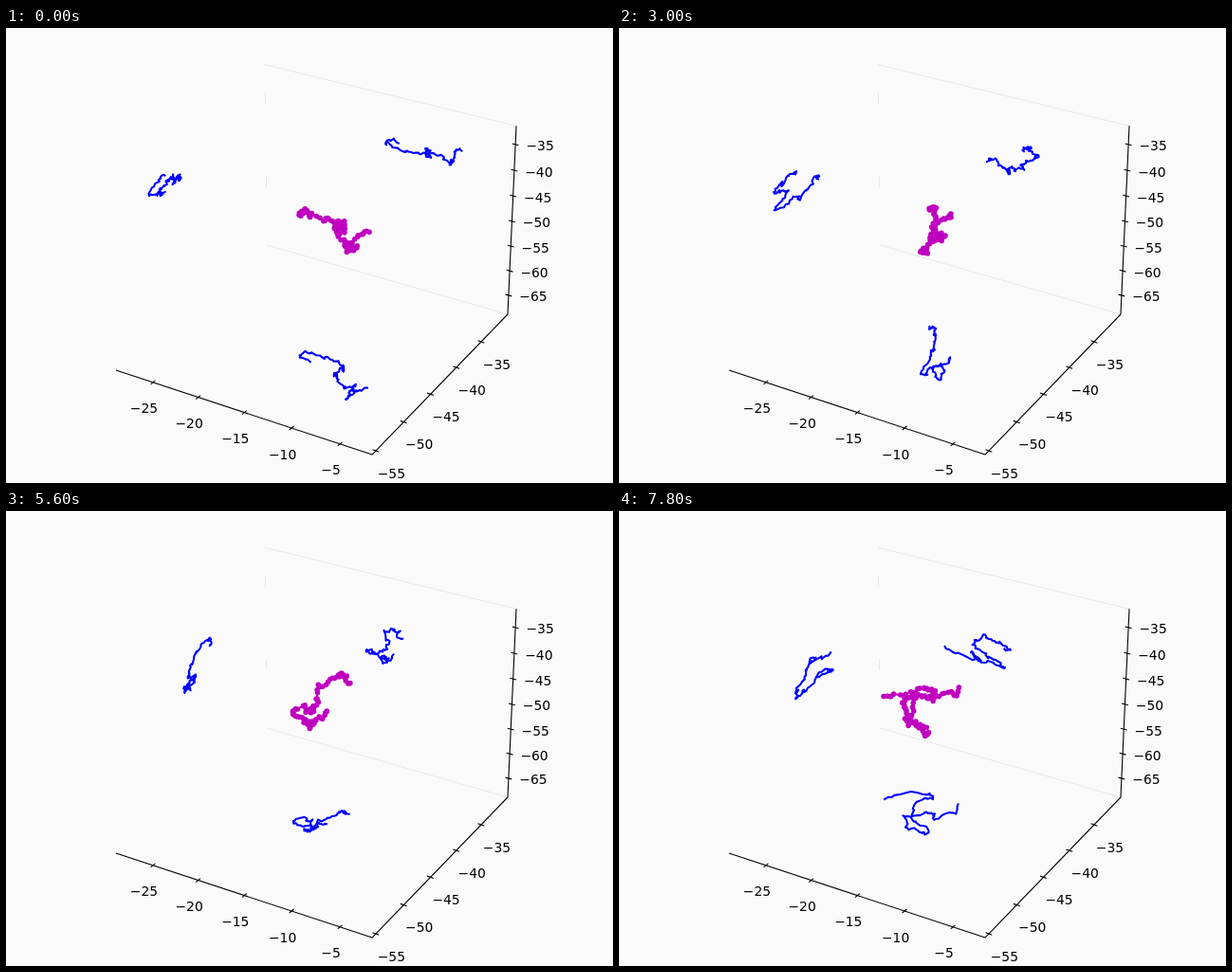
Write an HTML page that moves like this. It is 640x480 px and loops after 8000 ms.

```html
<!DOCTYPE html>
<html lang="en">
<head>
<meta charset="utf-8">
<title>Chain in a box</title>
<style>
html, body { margin: 0; width: 100%; height: 100%; overflow: hidden; background: #fafafa; }
svg { display: block; width: 640px; height: 480px; }
path { fill: none; stroke-linejoin: round; }
.edge { stroke: #e9e9e9; }
.axis { stroke: #000; stroke-width: 1.1; }
.shadow { stroke: #00f; stroke-width: 2.08; stroke-linecap: square; }
.bond { stroke: #bf00bf; stroke-width: 2.08; }
.bead { stroke: #bf00bf; stroke-width: 5.6; stroke-linecap: round; }
text { font: 13.89px "DejaVu Sans", sans-serif; text-anchor: middle; }
</style>
</head>
<body>
<svg id="stage" viewBox="0 0 640 480"></svg>
<script>
const stage = document.getElementById('stage');
const BEADS = 97, STEP = 200, LOOP = 8000;

function add(tag, attrs, text) {
  const el = document.createElementNS(stage.namespaceURI, tag);
  for (const key in attrs) el.setAttribute(key, attrs[key]);
  if (text) el.textContent = text;
  return stage.appendChild(el);
}

const point = p => p[0].toFixed(2) + ' ' + p[1].toFixed(2);
const line = pts => 'M' + pts.map(point).join('L');
const mix = (p, q, u) => p.map((v, k) => v + (q[k] - v) * u);

// Perspective view of the unit box.
const WA = -0.0603, WB = 0.097, WC = -0.04355;
function project(a, b, c) {
  const w = 1 + WA * a + WB * b + WC * c;
  return [(116 + 246.72 * a + 185.68 * b - 14.09 * c) / w,
          (361 + 61.87 * a - 109.79 * b - 210.5 * c) / w];
}

// Box position from a floor shadow (x, y) and the height of the back shadow.
function locate([x, y, h]) {
  const p = 246.72 - x * WA, q = 185.68 - x * WB, r = x - 116;
  const s = 61.87 - y * WA, t = -109.79 - y * WB, u = y - 361;
  const det = p * t - q * s;
  const a = (r * t - q * u) / det, b = (p * u - s * r) / det;
  const c = (251.21 + 61.87 * a - h * (1 + WB + WA * a)) / (210.5 + h * WC);
  return [a, b, c];
}

function rand(n) {
  const v = Math.sin(n * 127.1 + 11.7) * 43758.5453;
  return v - Math.floor(v);
}

// Kinked noise: straight runs between random values, at three scales.
function kinks(i, seed) {
  return [[7, 4], [3, 3], [1, 1.2]].reduce((sum, [run, size]) => {
    const n = Math.floor(i / run), u = i / run - n;
    const value = m => 2 * rand(seed + run * 50 + m) - 1;
    return sum + size * (value(n) * (1 - u) + value(n + 1) * u);
  }, 0);
}

// A smooth curve through a few bends, roughened into a chain.
function pose(step, ...bends) {
  const spans = bends.length - 1;
  const beads = Array.from({ length: BEADS }, (_, i) => {
    const t = i / (BEADS - 1) * spans, n = Math.min(Math.floor(t), spans - 1), u = t - n;
    const p = bends[Math.max(n - 1, 0)], q = bends[n];
    const r = bends[n + 1], s = bends[Math.min(n + 2, spans)];
    return q.map((v, k) => v + kinks(i, step * 997 + k * 311) +
      u / 2 * (r[k] - p[k] + u * (2 * p[k] - 5 * v + 4 * r[k] - s[k] +
      u * (3 * (v - r[k]) + s[k] - p[k]))));
  });
  return { step, beads };
}

const poses = [
  pose(0, [318, 355, 118], [314, 342, 122], [337, 347, 129], [358, 357, 135], [348, 362, 127],
    [355, 374, 133], [364, 378, 140], [358, 388, 137], [378, 382, 129]),
  pose(8, [350, 322, 133], [327, 328, 125], [327, 344, 142], [335, 352, 140], [350, 352, 131],
    [337, 358, 126], [344, 363, 124], [335, 373, 124], [365, 374, 131]),
  pose(15, [323, 315, 137], [331, 320, 139], [331, 336, 148], [333, 345, 148], [319, 364, 148],
    [341, 356, 141], [336, 368, 134], [330, 359, 127], [351, 347, 125]),
  pose(20, [346, 327, 144], [335, 320, 149], [325, 338, 150], [341, 342, 154], [332, 355, 147],
    [349, 348, 145], [344, 343, 134], [361, 338, 121], [349, 323, 122]),
  pose(28, [341, 332, 157], [314, 339, 152], [322, 334, 155], [307, 327, 146], [322, 328, 149],
    [324, 331, 138], [336, 324, 126], [356, 314, 125], [360, 321, 136]),
  pose(32, [337, 301, 143], [317, 304, 140], [323, 318, 148], [312, 333, 157], [311, 343, 157],
    [336, 343, 158], [312, 331, 150], [342, 328, 141], [358, 311, 135]),
  pose(39, [283, 298, 145], [328, 297, 153], [313, 314, 155], [323, 336, 162], [308, 335, 153],
    [302, 325, 139], [322, 323, 131], [338, 322, 138], [357, 314, 145])
];

// Blend the neighbouring poses and add waves that vanish at each pose.
function chainAt(step) {
  let n = 0;
  while (n < poses.length - 2 && poses[n + 1].step <= step) n++;
  const from = poses[n], to = poses[n + 1];
  const u = (step - from.step) / (to.step - from.step);
  const swell = 0.7 * Math.sin(Math.PI * u);
  return from.beads.map((bead, i) => mix(bead, to.beads[i], u)
    .map((v, k) => v + swell * kinks(i, step * 997 + k * 311)));
}

// Ticks every 5 units; place(t) maps the running position onto one box edge.
function drawAxis(place, first, count, start, gap, tick, label) {
  for (let i = 0; i < count; i++) {
    const [x, y] = place(start + i * gap);
    add('path', { class: 'axis', d: line([[x - tick[0], y - tick[1]], [x + tick[0], y + tick[1]]]) });
    add('text', { x: x + label[0], y: y + label[1] + 5 }, '\u2212' + (first - 5 * i));
  }
}

const corner = (...p) => project(...p);
add('path', { class: 'edge', d: line([corner(0, 1, 1), corner(1, 1, 1)]) +
  line([corner(0, 1, 0), corner(1, 1, 0)]) + 'M273.5 68V80M274.5 156V168' });
add('path', { class: 'axis', d: line([corner(0, 0, 0), corner(1, 0, 0), corner(1, 1, 0), corner(1, 1, 1)]) });
drawAxis(a => project(a, 0, 0), 25, 5, 0.1523, 0.1822, [2.4, -2], [-9.5, 27.5]);
drawAxis(b => project(1, b, 0), 55, 5, 0.0246, 0.1909, [3.4, 1.2], [16.5, 23.7]);
drawAxis(c => project(1, 1, c), 65, 7, 0.1046, 0.1334, [3.4, 0.9], [26, 1.5]);

const shadows = [0, 1, 2].map(() => add('path', { class: 'shadow' }));
const bond = add('path', { class: 'bond' });
const bead = add('path', { class: 'bead' });

function draw(step) {
  const spots = chainAt(step).map(locate);
  const views = [
    spots.map(([a, b]) => project(a, b, 0)),
    spots.map(([a, b, c]) => project(a, 1, c)),
    spots.map(([a, b, c]) => project(0, b, c))
  ];
  views.forEach((pts, i) => shadows[i].setAttribute('d', line(pts)));
  const chain = spots.map(s => project(...s));
  bond.setAttribute('d', line(chain));
  bead.setAttribute('d', chain.map(p => 'M' + point(p) + 'h0').join(''));
}

let start = null, shown = -1;
function tick(now) {
  if (start === null) start = now;
  const step = Math.floor((now - start) % LOOP / STEP);
  if (step !== shown) draw(shown = step);
  requestAnimationFrame(tick);
}
draw(0);
requestAnimationFrame(tick);
</script>
</body>
</html>
```
